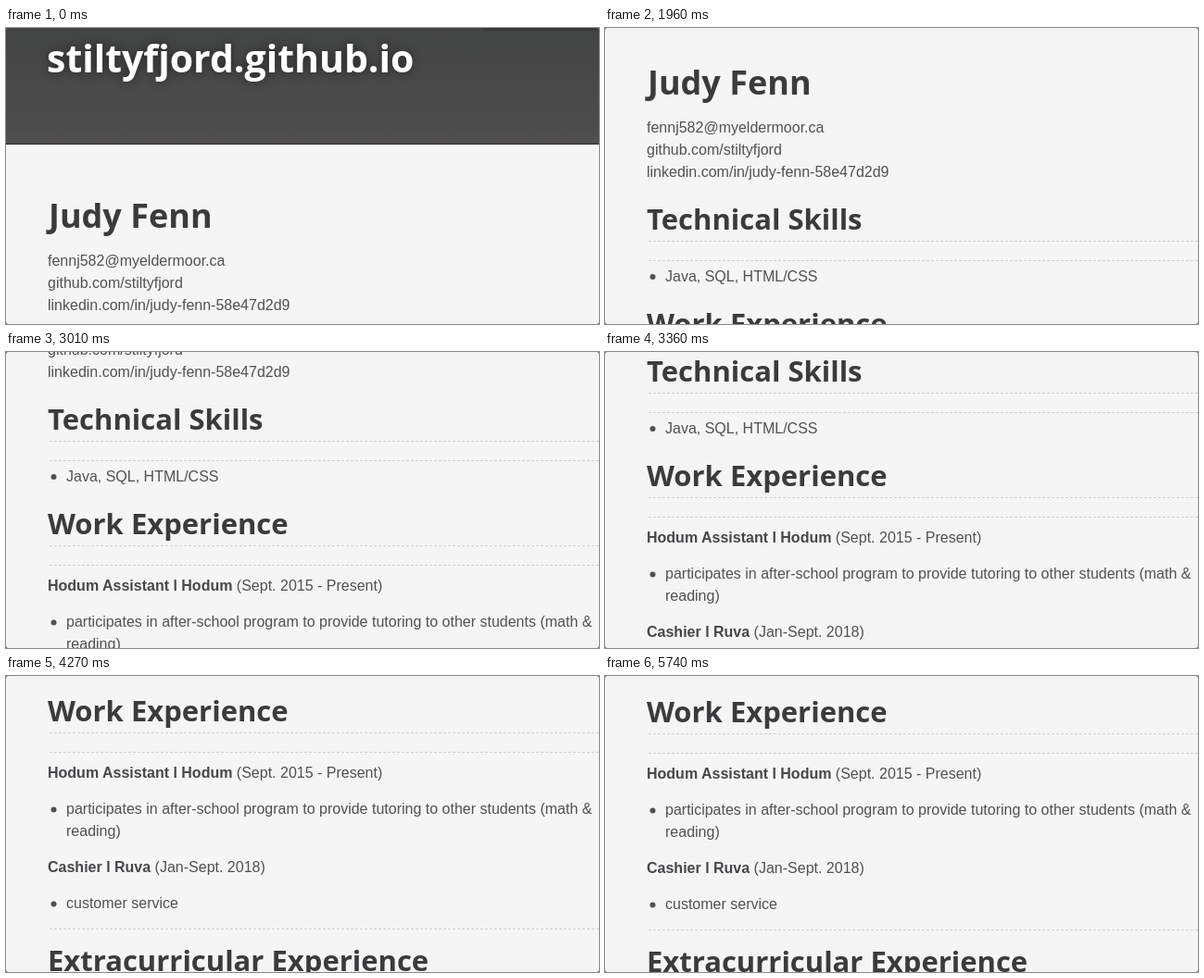
Animation, 640 px wide and 320 px high, one loop 7.42 s. Source, as an HTML page:

```html
<!DOCTYPE html>
<html lang="en">
<head>
<meta charset="utf-8">
<title>Résumé page scroll</title>
<style>
  html, body { margin: 0; width: 100%; height: 100%; overflow: hidden; background: #f5f5f5; }
  svg { display: block; width: 640px; height: 320px; }
  text { font: 16px "Liberation Sans", Arial, sans-serif; fill: #515155; }
  .title, .name, .head { font-family: "Open Sans", "Noto Sans", sans-serif; font-weight: 700; fill: #3b3b3e; }
  .title { font-size: 41px; fill: #fff; text-shadow: 0 0 10px rgba(17, 17, 17, .6); }
  .name { font-size: 36px; }
  .head { font-size: 31px; }
  .bold { font-weight: 700; fill: #47474b; }
  .rules { stroke: #d0d0d0; stroke-dasharray: 3 2; }
  .dots { fill: #515155; }
</style>
</head>
<body>
<svg viewBox="0 0 640 320">
  <defs>
    <linearGradient id="shade" x2="0" y2="1">
      <stop stop-color="#434444"/>
      <stop offset=".75" stop-color="#4b4b4b"/>
      <stop offset="1" stop-color="#514f4f"/>
    </linearGradient>
  </defs>
  <rect width="640" height="320" fill="#f5f5f5"/>
  <g id="page">
    <rect width="640" height="125" fill="url(#shade)"/>
    <rect y="125" width="640" height="1" fill="#2a2828"/>
    <rect x="513" y="-20" width="140" height="23" rx="3" fill="#393939"/>
    <text class="title" x="44" y="48">stiltyfjord.github.io</text>

    <text class="name" x="46" y="216">Judy Fenn</text>
    <text x="45" y="257">fennj582@myeldermoor.ca</text>
    <text x="45" y="281">github.com/stiltyfjord</text>
    <text x="45" y="305">linkedin.com/in/judy-fenn-58e47d2d9</text>

    <text class="head" x="45" y="362">Technical Skills</text>
    <text x="65" y="418">Java, SQL, HTML/CSS</text>

    <text class="head" x="45" y="475">Work Experience</text>
    <text x="45" y="536"><tspan class="bold">Hodum Assistant l Hodum</tspan> (Sept. 2015 - Present)</text>
    <text x="65" y="575">participates in after-school program to provide tutoring to other students (math &amp;</text>
    <text x="65" y="599">reading)</text>
    <text x="45" y="638"><tspan class="bold">Cashier l Ruva</tspan> (Jan-Sept. 2018)</text>
    <text x="65" y="677">customer service</text>

    <text class="head" x="45" y="745">Extracurricular Experience</text>

    <path class="rules" d="M47 374.5H640M47 395.5H640M47 487.5H640M47 508.5H640M47 699.5H640"/>
    <g class="dots">
      <circle cx="51.5" cy="413" r="3"/>
      <circle cx="51.5" cy="570.5" r="3"/>
      <circle cx="51.5" cy="672.5" r="3"/>
    </g>
  </g>
  <!-- rounded window corners -->
  <path fill="#777" fill-rule="evenodd" d="M0 0H640V320H0ZM3 0Q0 0 0 3V317Q0 320 3 320H637Q640 320 640 317V3Q640 0 637 0Z"/>
</svg>
<script>
const LOOP = 7420, TICK = 70;

// each flick: start and duration in ms, distance in px
const flicks = [[1330, 910, 172], [2380, 630, 106], [3080, 770, 128], [3920, 350, 20]];
// one-pixel steps up or down while the page settles
const nudges = [[4410, -1], [4760, 1], [4900, 1], [5040, -1], [5250, -1]];

// quick start, long slow-down
const ease = p => 1 - (1 - p ** 1.5) ** 2.1;
const clamp = p => Math.min(1, Math.max(0, p));

function scrollAt(t) {
  let y = 0;
  for (const [start, time, distance] of flicks) y += distance * ease(clamp((t - start) / time));
  for (const [start, step] of nudges) if (t >= start) y += step;
  return Math.round(y);
}

const page = document.getElementById("page");

function draw() {
  const t = Math.floor(performance.now() % LOOP / TICK) * TICK;
  page.setAttribute("transform", `translate(0 ${-scrollAt(t)})`);
  requestAnimationFrame(draw);
}
draw();
</script>
</body>
</html>
```
